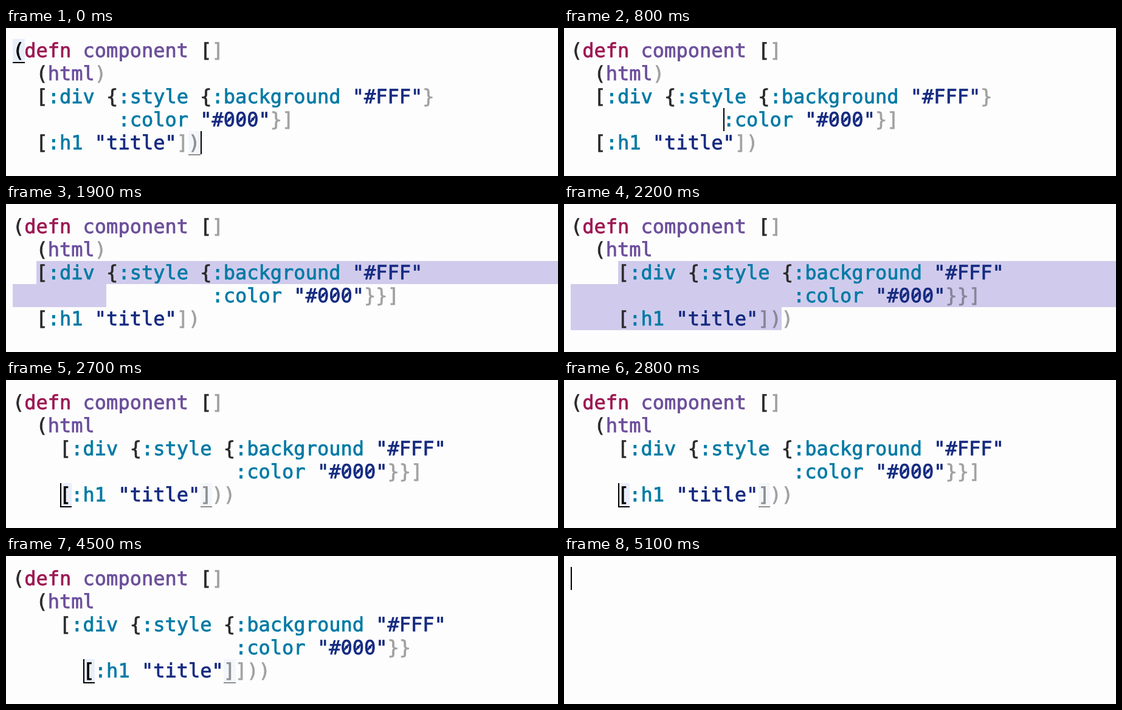
An HTML page that plays this animation: 908 px wide and 244 px high, repeating every 5300 ms.

```html
<!DOCTYPE html>
<html lang="en">
<head>
<meta charset="utf-8">
<title>Indentation-driven brackets</title>
<style>
  html, body { margin: 0; width: 100%; height: 100%; overflow: hidden; background: #fdfdfd; }
  svg { display: block; }
  text {
    font: 32px "DejaVu Sans Mono", monospace; text-rendering: geometricPrecision;
    color: #2a2a2a; fill: currentColor; stroke: currentColor; stroke-width: .8;
  }
  .kw { color: #007aa5; }
  .str { color: #152a80; }
  .def { color: #9c1853; }
  .fn { color: #6c4f9b; }
  .zero { stroke: #152a80; stroke-width: 3; }
  .sel { fill: #d0cbec; }
  .hit rect { fill: #e8eefa; }
  .hit text { color: #000; }
  .hit .rule { fill: #000; }
  .dim { opacity: .43; }
</style>
</head>
<body>
<svg id="stage" width="908" height="244" viewBox="0 0 908 244"></svg>
<script>
const LOOP = 5300, WIDTH = 908;
const LEFT = 11, TOP = 18, CHAR = 19.265, LINE = 38, ASCENT = 30;
const TOKEN = /(:\w+)|("[^"]*")|(defn)|(component|html)|[()[\]{}]/g;
const KINDS = ["kw", "str", "def", "fn"];
const stage = document.getElementById("stage");

// Each entry changes part of the editor state. Positions are [line, column].
const steps = [
  [0, { color: 9, div: 2, h1: 2, cursor: [4, 16], hits: [[0, 0], [4, 15]], sel: null }],
  [300, { cursor: [3, 9], hits: [] }]
];
for (let i = 1; i <= 8; i++) {
  steps.push([400 + i * 100, { color: 9 + i, cursor: [3, 9 + i] }]);
}
steps.push(
  [1700, { cursor: [2, 2], hits: [[2, 2], [3, 32]] }],
  [1900, { cursor: null, hits: [], sel: [2, 2, 3, 8] }],
  [2000, { sel: [2, 2, 4, 16] }],
  [2200, { div: 4, h1: 4, color: 19, sel: [2, 4, 4, 18] }],
  [2600, { sel: null, ...onHeading(4) }],
  [3200, { h1: 5, ...onHeading(5) }],
  [3400, { h1: 6, ...onHeading(6) }],
  [5100, { blank: true, cursor: [0, 0], hits: [] }]
);

let state = {};
const states = steps.map(([, change]) => (state = { ...state, ...change }));

function onHeading(col) {
  return { cursor: [4, col], hits: [[4, col], [4, col + 12]] };
}

const colX = col => LEFT + col * CHAR;
const edgeX = col => Math.ceil(colX(col));
const lineY = line => TOP + line * LINE;
const rect = (x, y, w, h, cls = "") =>
  `<rect class="${cls}" x="${x}" y="${y}" width="${w}" height="${h}"/>`;
const label = (line, col, str, cls = "") =>
  `<text class="${cls}" x="${colX(col)}" y="${lineY(line) + ASCENT}">${str}</text>`;

// Closing brackets follow the indentation.
function codeLines({ color, div, h1, blank }) {
  if (blank) return [];
  const nestedColor = color > div + 14;
  const nestedHead = h1 > div;
  const inHtml = div > 2;
  return [
    "(defn component []",
    "  (html" + (inHtml ? "" : ")"),
    " ".repeat(div) + '[:div {:style {:background "#FFF"' + (nestedColor ? "" : "}"),
    " ".repeat(color) + ':color "#000"' + (nestedColor ? "}}" : "}") + (nestedHead ? "" : "]"),
    " ".repeat(h1) + '[:h1 "title"]' + (nestedHead ? "]" : "") + (inHtml ? "))" : ")")
  ];
}

function slashes(line, col, str) {
  let out = "";
  [...str].forEach((ch, i) => {
    if (ch !== "0") return;
    const x = colX(col + i + 0.5), y = lineY(line) + ASCENT - 11.7;
    out += `<line class="zero" x1="${x - 3.6}" y1="${y + 4.4}" x2="${x + 3.6}" y2="${y - 4.4}"/>`;
  });
  return out;
}

function drawLine(code, line, hits) {
  const tail = code.search(/[\])}]+$/);
  let out = "";
  for (const m of code.matchAll(TOKEN)) {
    const col = m.index;
    const kind = KINDS[m.slice(1).findIndex(Boolean)] || "";
    let part = label(line, col, m[0], kind) + (kind === "str" ? slashes(line, col, m[0]) : "");
    const hit = hits.some(([l, c]) => l === line && c === col);
    if (hit) {
      const x = edgeX(col), y = lineY(line), w = edgeX(col + 1) - x;
      part = rect(x, y, w, LINE) + rect(x, y + LINE, w, 2, "rule") + part;
    }
    const dim = tail >= 0 && col >= tail;
    out += `<g class="${hit ? "hit" : ""} ${dim ? "dim" : ""}">${part}</g>`;
  }
  return out;
}

function drawSelection([l0, c0, l1, c1]) {
  let out = "";
  for (let l = l0; l <= l1; l++) {
    const x = l === l0 ? edgeX(c0) : LEFT;
    const end = l === l1 ? Math.round(colX(c1)) : WIDTH;
    out += rect(x, lineY(l), end - x, LINE, "sel");
  }
  return out;
}

function draw(s) {
  let out = s.sel ? drawSelection(s.sel) : "";
  codeLines(s).forEach((code, i) => { out += drawLine(code, i, s.hits); });
  if (s.cursor) out += rect(edgeX(s.cursor[1]), lineY(s.cursor[0]), 2, LINE);
  stage.innerHTML = out;
}

let shown = -1, start = null;
function tick(now) {
  if (start === null) start = now;
  const t = (now - start) % LOOP;
  let i = steps.length - 1;
  while (steps[i][0] > t) i--;
  if (i !== shown) draw(states[shown = i]);
  requestAnimationFrame(tick);
}
draw(states[0]);
requestAnimationFrame(tick);
</script>
</body>
</html>
```
